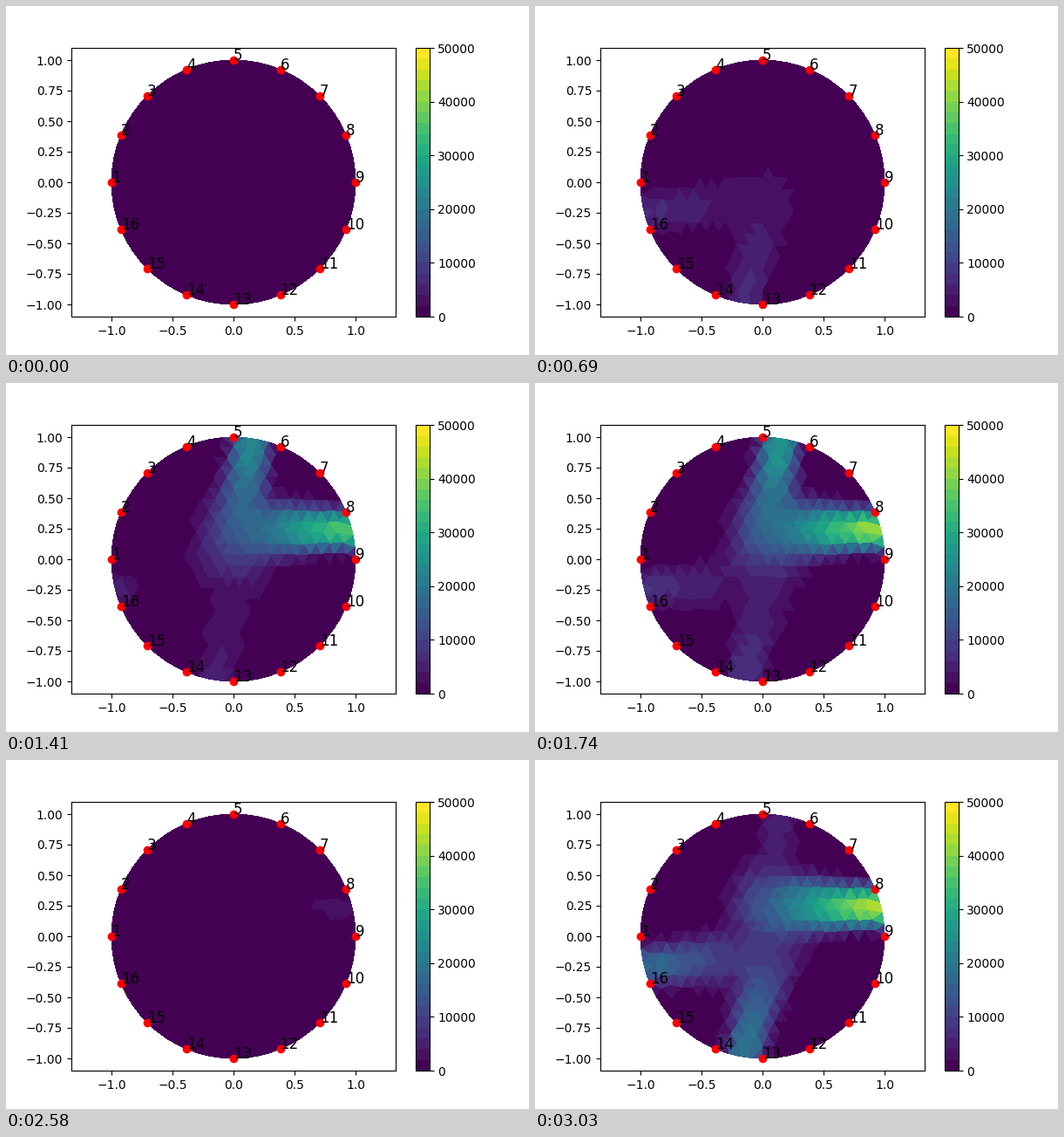
A matplotlib script for the animation above (3.06 s loop, 600 px wide and 400 px high).

```python
import numpy as np
import matplotlib.pyplot as plt
from matplotlib.animation import FuncAnimation
from matplotlib.tri import Triangulation

STEP, FRAMES = 30, 102
VMAX, BANDS = 50000, 25
RAMP = 480          # ms for a press to build up or let go

angle = np.pi - np.arange(16) * np.pi / 8
electrodes = np.column_stack([np.cos(angle), np.sin(angle)])


def disc_mesh(fixed, h=0.1, rounds=120):
    """Relax a hexagonal grid inside the unit circle like a truss of springs."""
    x, y = np.meshgrid(np.arange(-1, 1 + h, h),
                       np.arange(-1, 1 + h, h * np.sqrt(3) / 2))
    x[1::2] += h / 2
    p = np.column_stack([x.ravel(), y.ravel()])
    p = p[np.hypot(*p.T) < 1]
    gap = np.linalg.norm(p[:, None] - fixed[None], axis=2).min(axis=1)
    p = np.vstack([fixed, p[gap > h / 2]])
    for k in range(rounds):
        if k % 4 == 0:
            a, b = Triangulation(*p.T).edges.T
        bar = p[a] - p[b]
        size = np.hypot(*bar.T)
        rest = 1.2 * np.sqrt(np.mean(size ** 2))
        push = (np.maximum(rest - size, 0) / size)[:, None] * bar
        force = np.zeros_like(p)
        np.add.at(force, a, push)
        np.add.at(force, b, -push)
        force[:len(fixed)] = 0
        p = p + 0.2 * force
        p /= np.maximum(np.hypot(*p.T), 1)[:, None]
    tri = Triangulation(*p.T)
    (x0, x1, x2), (y0, y1, y2) = (c[tri.triangles].T for c in p.T)
    area = abs((x1 - x0) * (y2 - y0) - (x2 - x0) * (y1 - y0)) / 2
    return Triangulation(*p.T, tri.triangles[area > 0.05 * h * h])


mesh = disc_mesh(electrodes)
centres = np.column_stack([mesh.x, mesh.y])[mesh.triangles].mean(axis=1)


def arm(degrees, hub):
    """Ridge from the rim to the hub, wider and lower inwards, with a faint
    echo on the opposite rim."""
    tip = np.array([np.cos(np.radians(degrees)), np.sin(np.radians(degrees))])
    axis = tip - hub
    length = np.hypot(*axis)
    along, across = axis / length, np.array([-axis[1], axis[0]]) / length
    s = (centres - hub) @ along / length
    d = abs((centres - hub) @ across)
    half = 0.22 + 0.25 * (1 - np.clip(s, 0, 1)) ** 2
    height = 0.3 + 0.7 * np.clip(s / 0.85, 0, 1)
    fade = np.exp(-(np.minimum(s, 0) / 0.25) ** 2)
    ridge = height * fade * np.exp(-2.3 * (d / half) ** 2.5)
    away = np.hypot(*(centres + 0.96 * tip).T)
    return np.maximum(ridge, 0.17 * np.exp(-(away / 0.12) ** 2))


def press(t, on, off, peak):
    return peak * np.clip(min(t - on, off - t) / RAMP, 0, 1)


# each arm with its presses: start ms, end ms, peak
arms = [
    (arm(14, (0, 0.25)),
     [(150, 510, 6700), (1000, 2520, 41000), (2553, 3600, 43000)]),
    (arm(81.5, (0, 0)), [(980, 2520, 26000), (2650, 3600, 6000)]),
    (arm(261, (0.08, 0)),
     [(480, 1550, 15000), (1560, 2520, 20000), (2570, 3600, 21000)]),
    (arm(194, (0, -0.15)),
     [(480, 1470, 14000), (1560, 2520, 18000), (2570, 3600, 17000)]),
]


def field(t):
    return sum((shape * sum(press(t, *p) for p in presses)) ** 3
               for shape, presses in arms) ** (1 / 3)


fig, ax = plt.subplots(figsize=(6, 4), dpi=100)
patches = ax.tripcolor(mesh, facecolors=field(0), vmin=0, vmax=VMAX,
                       cmap=plt.get_cmap("viridis", BANDS))
fig.colorbar(patches, ax=ax)
ax.plot(*electrodes.T, "ro")
for i, (x, y) in enumerate(electrodes, 1):
    ax.text(x, y, str(i), fontsize=12)
ax.set_xlim(-372 / 280, 372 / 280)
ax.set_ylim(-1.1, 1.1)


def update(i):
    patches.set_array(field(i * STEP))
    return patches,


anim = FuncAnimation(fig, update, frames=FRAMES, interval=STEP,
                     repeat=True, repeat_delay=0)
plt.show()
```
